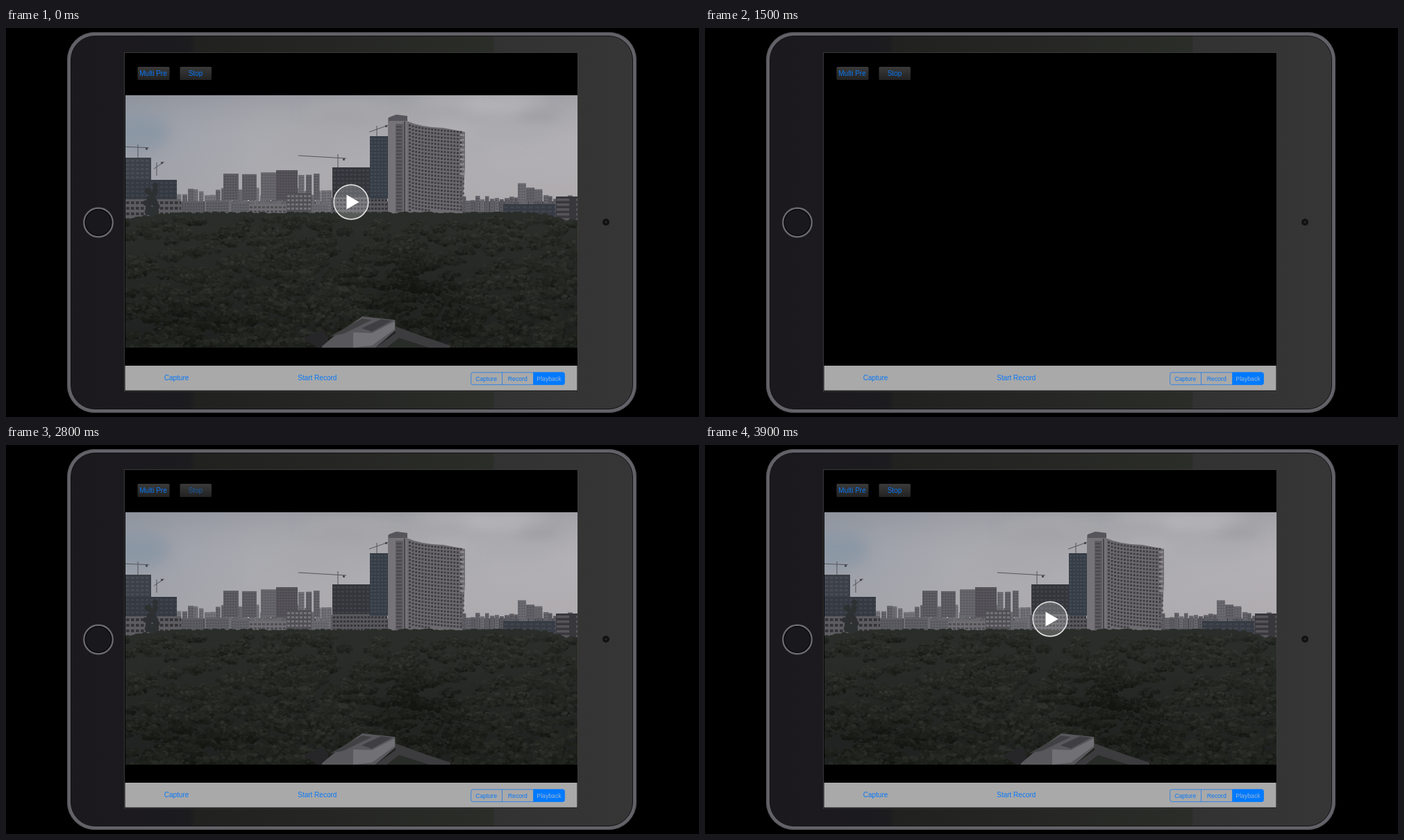
An HTML page with a canvas for the animation above (4000 ms loop, 998 by 561 pixels).

```html
<!DOCTYPE html>
<html lang="en">
<head>
<meta charset="utf-8">
<title>Tablet playback</title>
<style>
  html, body { margin: 0; width: 100%; height: 100%; overflow: hidden; background: #000; }
  svg, canvas { position: absolute; left: 0; top: 0; }
  #photo { left: 172px; top: 97px; }
  text { font: 10px "Liberation Sans", Arial, sans-serif; fill: #0878f8; text-anchor: middle; }
  .small { font-size: 8.7px; }
</style>
</head>
<body>
<svg width="998" height="561" viewBox="0 0 998 561">
  <defs>
    <linearGradient id="shell" gradientUnits="userSpaceOnUse" x1="94" x2="904" y1="0" y2="0">
      <stop offset="0" stop-color="#1b191e"/>
      <stop offset=".21" stop-color="#1c1b1e"/>
      <stop offset=".22" stop-color="#212120"/>
      <stop offset=".75" stop-color="#2b2d28"/>
      <stop offset=".752" stop-color="#323232"/>
      <stop offset="1" stop-color="#363636"/>
    </linearGradient>
    <linearGradient id="key" x2="0" y2="1">
      <stop offset="0" stop-color="#3a3a3a"/>
      <stop offset="1" stop-color="#222"/>
    </linearGradient>
  </defs>
  <rect x="88" y="6" width="820" height="549" rx="40" fill="#636268"/>
  <rect x="88.5" y="6.5" width="819" height="548" rx="39.5" fill="none" stroke="#505054"/>
  <rect x="93.5" y="11.5" width="809" height="538" rx="34.5" fill="url(#shell)" stroke="#111113"/>
  <circle cx="133" cy="280.5" r="20.6" fill="#19181c" stroke="#6b6a6e" stroke-width="2.6"/>
  <circle cx="133" cy="280.5" r="18.9" fill="none" stroke="#050506" stroke-width="1.2"/>
  <circle cx="864" cy="280" r="5" fill="#121212"/>
  <circle cx="864" cy="280" r="1.6" fill="#29292c"/>
  <rect x="170.5" y="35.5" width="653" height="488.5" fill="#000" stroke="#444" stroke-width=".8"/>
  <rect x="171.5" y="487" width="651" height="35.7" fill="#a9a9a9"/>
  <rect x="189.5" y="56" width="46" height="19" rx="1.5" fill="url(#key)"/>
  <rect x="250.5" y="56" width="45.5" height="19" rx="1.5" fill="url(#key)"/>
  <text x="212" y="68.6">Multi Pre</text>
  <text id="stop" x="273" y="68.6">Stop</text>
  <text x="245.5" y="508.4">Capture</text>
  <text x="448.3" y="508.4">Start Record</text>
  <rect x="669.7" y="496.8" width="134.8" height="17.6" rx="2.5" fill="none" stroke="#2a80e6" stroke-width=".9"/>
  <path d="M714.5 497v17.4M759.5 497v17.4" stroke="#2a80e6" stroke-width=".9"/>
  <path d="M759.5 496.6h42a3 3 0 0 1 3 3v12a3 3 0 0 1-3 3h-42z" fill="#007aff"/>
  <text class="small" x="691.6" y="508.8">Capture</text>
  <text class="small" x="736.8" y="508.8">Record</text>
  <text class="small" x="782" y="508.8" style="fill:#9fb6d2">Playback</text>
</svg>
<canvas id="photo" width="651" height="364"></canvas>
<svg id="play" width="998" height="561" viewBox="0 0 998 561">
  <circle cx="497" cy="251" r="24.8" fill="#fff" fill-opacity=".22" stroke="#dedede" stroke-width="1.7"/>
  <path d="M490.5 240.5L508.5 251L490.5 261.5z" fill="#fff"/>
</svg>
<script>
const LOOP = 4000;
const LEFT = 172, TOP = 97, RIGHT = 823, BOTTOM = 461;
const byId = id => document.getElementById(id);
const c = byId('photo').getContext('2d');

let seed = 7;
const rnd = () => (seed = seed * 16807 % 2147483647) / 2147483647;
const between = (a, b) => a + rnd() * (b - a);
const bump = (x, mid, width) => Math.exp(-(((x - mid) / width) ** 2));
const grey = (v, blue = 4) => `rgb(${v},${v},${v + blue})`;

function box(x, y, w, h, fill) {
  c.fillStyle = fill;
  c.fillRect(x, y, w, h);
}
function shape(path, fill) {
  c.fillStyle = fill;
  c.fill(new Path2D(path));
}
function blob(x, y, rx, ry, fill) {
  c.fillStyle = fill;
  c.beginPath();
  c.ellipse(x, y, rx, ry, 0, 0, 7);
  c.fill();
}
// A block of flats: a wall with a regular grid of openings.
function block(x, y, w, h, wall, glass, dx = 6, dy = 6) {
  box(x, y, w, h, wall);
  for (let v = y + 3; v < y + h - 2; v += dy)
    for (let u = x + 1; u < x + w - 1; u += dx) box(u, v, Math.min(dx * .65, x + w - u), dy * .5, glass);
}
// A row of blocks with uneven tops.
function row(from, to, step, top, spread, base, tone) {
  for (let x = from; x < to; x += step) {
    const y = top + between(-spread, spread), v = tone + between(-9, 9);
    block(x, y, step * between(.75, 1.05), base - y, grey(v, 6), grey(v - 14, 6), 4, 4);
  }
}

function sky() {
  const across = c.createLinearGradient(LEFT, 0, RIGHT, 0);
  across.addColorStop(0, '#959ba5');
  across.addColorStop(.3, '#a8a9af');
  across.addColorStop(1, '#b2b0b4');
  box(LEFT, TOP, RIGHT - LEFT, 180, across);
  const down = c.createLinearGradient(0, TOP, 0, 260);
  down.addColorStop(0, 'rgba(130,133,142,.35)');
  down.addColorStop(.4, 'rgba(180,178,182,.15)');
  down.addColorStop(1, 'rgba(172,166,168,.5)');
  box(LEFT, TOP, RIGHT - LEFT, 180, down);
  c.filter = 'blur(10px)';
  blob(190, 150, 45, 26, '#8c97a5');
  for (let i = 0; i < 16; i++) {
    const v = between(158, 184);
    blob(between(260, 810), between(100, 185), between(25, 70), between(5, 12), grey(v));
  }
  c.filter = 'none';
}

function crane(x, y, foot, from, to, tilt) {
  c.strokeStyle = '#55555b';
  c.lineWidth = 1;
  c.stroke(new Path2D(`M${x} ${y - 4}V${foot}M${from} ${y - tilt}L${to} ${y + tilt}`));
  box(to - 5, y + tilt, 3, 3, '#4a4a50');
}

function city() {
  box(LEFT, 250, RIGHT - LEFT, 30, '#46464a');
  row(246, 470, 8, 236, 6, 265, 108);
  row(655, RIGHT, 7, 245, 4, 265, 98);
  row(313, 385, 27, 210, 4, 248, 100);
  row(421, 452, 11, 212, 2, 248, 100);
  row(737, 770, 12, 227, 6, 250, 98);
  block(389, 205, 31, 44, '#56545a', '#4a494f', 4, 4);

  crane(190, 172, 190, LEFT, 206, .7);
  crane(217, 198, 213, 213, 228, -5);
  crane(478, 186, 203, 421, 490, 2);
  crane(534, 145, 156, 523, 551, -5);

  block(LEFT, 187, 37, 64, '#3c4048', '#494c54', 7);
  block(LEFT, 219, 74, 32, '#343942', '#3f434b', 7);
  block(LEFT, 247, 80, 32, '#5d5c60', '#353439', 7, 8);
  row(252, 470, 36, 249, 5, 272, 96);
  block(350, 254, 58, 14, '#6f6d72', '#504f54');
  block(404, 238, 36, 28, '#515055', '#75737a');

  block(470, 201, 54, 45, '#34353b', '#404148');
  block(470, 244, 79, 24, '#59585d', '#37363b', 5);
  block(524, 156, 27, 90, '#363d46', '#424a53', 5, 5);

  // The high-rise: a solid slab and a long facade below a sagging roof line.
  shape('M574 133Q600 144 630 144L661 150V200L657 267H574z', '#6c6a6e');
  for (let x = 580; x < 655; x += 4.6)
    for (let y = 137 + 12 * Math.sqrt((x - 578) / 80); y < 262; y += 5.1) box(x, y, 2.9, 2.9, '#3e3d42');
  for (let y = 153; y < 262; y += 7) box(654, y, 6, 3, y < 210 ? '#8a878b' : '#59575d');
  shape('M550 130L562 125L578 127V268H550z', '#757378');
  shape('M551 129L562 125L578 127V134H551z', '#55555b');
  block(561, 138, 11, 130, '#5f5d62', '#4a494e', 12, 5);
  box(573, 135, 2, 133, '#48464b');

  block(716, 254, 75, 18, '#363b44', '#40454d', 9);
  block(792, 243, 31, 42, '#38373b', '#57555a', 28, 7);
}

function crown(x, y, size) {
  const depth = (y - 266) / 195;
  const dark = 13 * bump(x, 585, 55) * bump(y, 372, 32) +
    8 * bump(x, 250, 90) * bump(y, 425, 30) + 8 * bump(x, 610, 90) * bump(y, 430, 22);
  const tone = 39 - 8 * depth - dark + between(-3, 3);
  for (let i = 0; i < 45; i++) {
    const a = between(0, 6.3), d = Math.sqrt(rnd()) * size;
    const lift = Math.sin(a) * d / size;
    const v = Math.max(20, tone - 8 * lift + between(-7, 7));
    const r = between(1, 2 + 1.2 * depth);
    blob(x + 1.5 * Math.cos(a) * d, y + .7 * lift * size, r * 1.4, r, `rgb(${v},${v + 2},${v - 3})`);
  }
}

function trees() {
  const g = c.createLinearGradient(0, 266, 0, BOTTOM);
  g.addColorStop(0, '#2c2f2a');
  g.addColorStop(1, '#1f2020');
  box(LEFT, 282, RIGHT - LEFT, 180, g);
  for (let x = LEFT; x < RIGHT; x += 4) {
    const top = 266 + 8 * bump(x, LEFT, 40) + 15 * bump(x, RIGHT, 35) + between(-1.5, 1.5);
    blob(x, top + 9, 7, 9, '#2a2d29');
  }
  for (let i = 0; i < 30; i++) blob(between(201, 218), between(225, 272), 4, 4, '#2e3132');
  for (let y = 276; y < 466; y += 3)
    for (let i = 0; i < 9; i++) crown(between(LEFT, RIGHT), y, between(6, 9 + (y - 266) / 20));
}

function roof() {
  shape('M428 447L458 434L468 461H448z', '#262628');
  shape('M455 459L474 443L513 416L560 421L561 436L532 461H455z', '#58575b');
  shape('M466 445L513 419L527 421L486 441z', '#414144');
  shape('M512 433L540 420L556 422L527 438z', '#3f3e42');
  shape('M500 439L527 440L560 423V434L527 458L500 461z', '#717074');
  shape('M560 430L604 446L640 458V461H532L561 440z', '#3c3c3e');
  shape('M566 447L610 461H548z', '#292b29');
}

c.translate(-LEFT, -TOP);
sky();
city();
trees();
roof();

// Each step is [time, opacity] and holds until the next one.
function track(id, ...steps) {
  const frames = steps.map(([t, opacity]) => ({ offset: t / LOOP, opacity, easing: 'steps(1, end)' }));
  frames.push({ offset: 1, opacity: steps.at(-1)[1] });
  byId(id).animate(frames, { duration: LOOP, iterations: Infinity });
}
track('photo', [0, 1], [1300, 0], [1800, 1], [3100, 0], [3200, 1]);
track('play', [0, 1], [1500, 0], [3100, 1]);
track('stop', [0, 1], [2700, .6], [2900, 1]);
</script>
</body>
</html>
```
